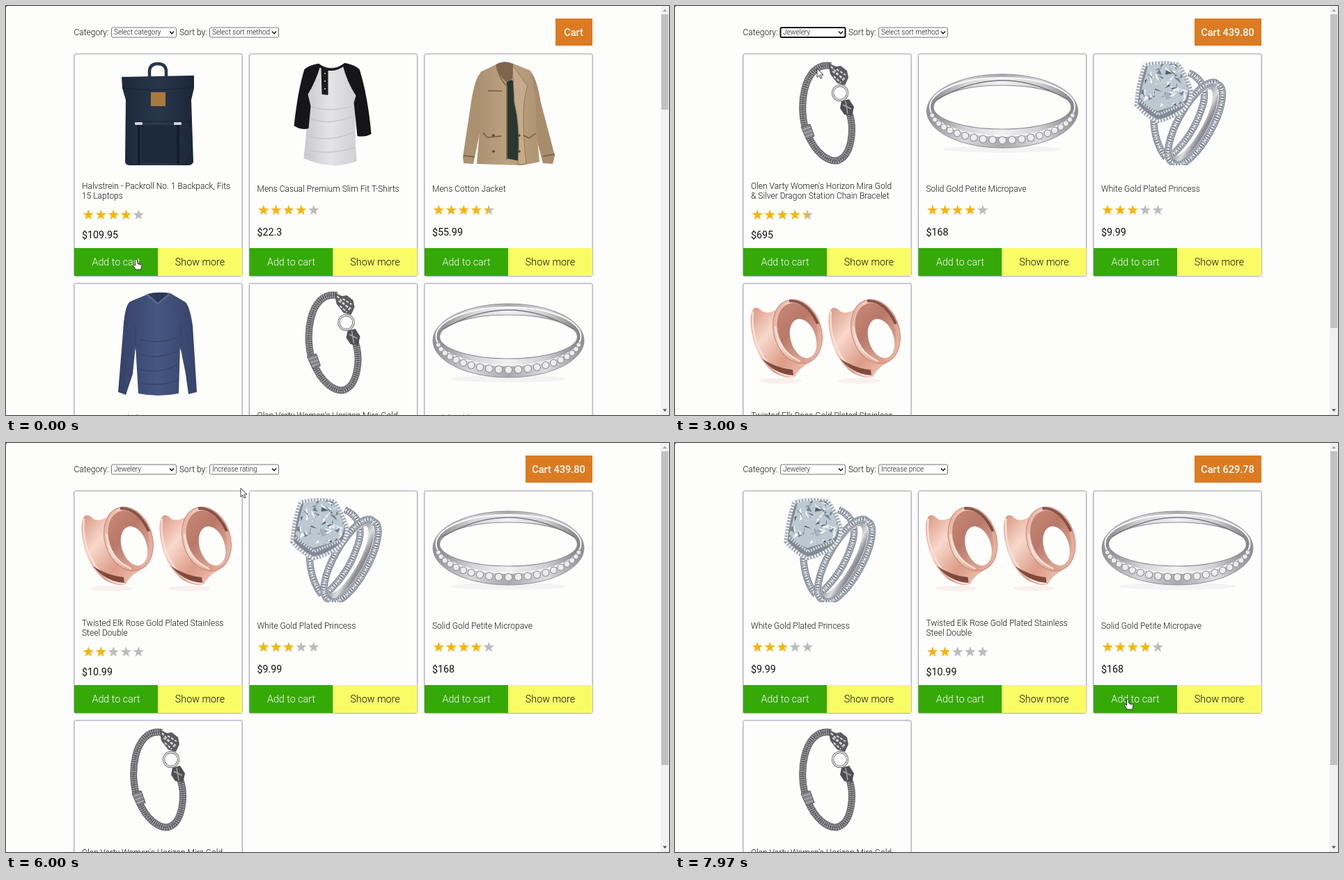
An HTML page that plays this animation: 952 by 588 pixels, repeating every 8000 ms.

```html
<!DOCTYPE html>
<html lang="en">
<head>
<meta charset="utf-8">
<title>Shop</title>
<style>
  html, body { margin: 0; width: 100%; height: 100%; overflow: hidden; background: #fdfdfc; }
  svg { display: block; width: 952px; height: 588px; }
  text { font: 300 12px Roboto, sans-serif; fill: #111; }
  .price { font-size: 14.3px; font-weight: 400; }
  .button { font-size: 14.3px; text-anchor: middle; }
  .cart { font-size: 14.5px; font-weight: 500; fill: #fff; text-anchor: middle; }
  .option { font-size: 10px; }
  .light { fill: #fff; }
</style>
</head>
<body>
<svg id="stage" viewBox="0 0 952 588" xmlns="http://www.w3.org/2000/svg"></svg>
<script>
const LOOP = 8000;
const stage = document.getElementById('stage');

let seed = 7;
const random = () => (seed = (seed * 16807) % 2147483647) / 2147483647;
const repeat = (n, draw) => Array.from({ length: n }, (_, i) => draw(i)).join('');
const path = (d, fill, more = '') => `<path d="${d}" fill="${fill}" ${more}/>`;
const line = (d, color, width = 1, more = '') =>
  `<path d="${d}" fill="none" stroke="${color}" stroke-width="${width}" ${more}/>`;
const rect = (x, y, w, h, fill, more = '') =>
  `<rect x="${x}" y="${y}" width="${w}" height="${h}" fill="${fill}" ${more}/>`;
const circle = (cx, cy, r, fill, more = '') => `<circle cx="${cx}" cy="${cy}" r="${r}" fill="${fill}" ${more}/>`;
const oval = (cx, cy, rx, ry, turn, attrs) =>
  `<ellipse cx="${cx}" cy="${cy}" rx="${rx}" ry="${ry}" transform="rotate(${turn} ${cx} ${cy})" ${attrs}/>`;
const text = (x, y, content, cls = '') => `<text x="${x}" y="${y}" class="${cls}">${content}</text>`;
const gradient = (id, colors, x2 = 1, y2 = 0) =>
  `<linearGradient id="${id}" x2="${x2}" y2="${y2}">${colors.map((c, i) =>
    `<stop offset="${i / (colors.length - 1)}" stop-color="${c}"/>`).join('')}</linearGradient>`;

const GOLD = '#f4b50f', PALE = '#bcbcbe', PAGE = '#fdfdfc';
const STONE = 'M78 17Q100 12 121 15L137 50Q134 66 126 72L92 82Q76 76 66 62Z';

const sparklingBand = d => line(d, '#858a95', 10) + line(d, '#b9bec8', 7.5) +
  line(d, '#666d7a', 6.5, 'stroke-dasharray="1.2 2.2"') + line(d, '#f0f2f5', 3, 'stroke-dasharray="1.8 2.6"');

function facets() {
  const shades = ['#fff', '#c3cfd7', '#75848f', '#e6edf1', '#a3b2bc', '#53626d'];
  return repeat(130, i => {
    const x = 62 + random() * 78, y = 12 + random() * 72;
    const near = () => `${(x + random() * 14 - 7).toFixed(1)} ${(y + random() * 14 - 7).toFixed(1)}`;
    return path(`M${near()}L${near()}L${near()}Z`, shades[i % shades.length]);
  });
}

function tunnel(dx) {
  return `<g transform="translate(${dx})">` +
    oval(54, 140, 30, 4, 0, 'fill="#f8ebe6" opacity=".7"') +
    path('M15 36Q8 44 12 70Q18 108 44 128Q62 138 74 134Q78 124 94 114L52 34Q34 48 24 37Q19 33 15 36Z', 'url(#rose)') +
    line('M14 40Q10 78 32 110Q50 134 72 133', '#f9e0d6', 2.5) +
    path('M27 108Q44 130 72 132L71 124Q48 122 27 108Z', '#6f3a2e', 'opacity=".85"') +
    oval(78, 69, 34, 47, -18, 'fill="url(#rose)" stroke="#c48a78"') +
    oval(78, 68, 28, 41, -18, 'fill="url(#hollow)"') +
    oval(86, 79, 18, 29, -18, `fill="${PAGE}"`) +
    line('M66 25Q92 24 107 58', '#6f3a2e', 4, 'opacity=".8"') +
    line('M46 62Q50 98 82 112', '#fbe6dd', 2) + '</g>';
}

const pictures = {
  backpack: () =>
    line('M108 34V24Q109 14 120 14Q131 14 132 24V34', '#27364c', 4.5) +
    path('M68 33L172 31V49L168 66L171 155Q170 160 163 160H80Q73 160 73 154L74 66L69 49Z', 'url(#navy)') +
    line('M69 49Q120 54 172 48M74 97H168', '#172234') +
    path('M95 101H148V158H95Z', '#1d293c', 'stroke="#35445b"') +
    line('M93 97V158M149 97V158', '#141d2c', 4) +
    rect(87, 98, 11, 4, '#cfd2d6', 'rx="1"') + rect(143, 98, 11, 4, '#cfd2d6', 'rx="1"') +
    rect(110, 55, 21, 20, '#a8793f'),

  tee: () =>
    path('M98 14Q118 24 138 13L153 58Q150 100 154 154Q118 168 78 150Q84 100 84 55Z', 'url(#cloth)') +
    path('M98 14Q86 16 79 22Q70 50 64 103Q74 110 85 107L88 75L84 58Q95 40 102 17Z', '#161619') +
    path('M138 13Q152 16 158 22Q170 60 175 115Q166 120 155 118L150 70L153 60Q140 40 134 16Z', '#161619') +
    line('M98 15Q118 30 138 14', '#161619', 3.5) + path('M103 19L113 21V59L104 58Z', '#1b1b1e') +
    line('M87 92Q110 104 148 90M84 118Q116 128 150 112M82 138Q116 146 152 134M90 76Q112 84 146 76', '#c8c8cc', 1.5) +
    repeat(3, i => circle(108.5, 28 + 11 * i, 1, '#ddd')),

  jacket: () =>
    path('M82 26Q72 32 66 75L55 148L56 157L70 158L80 110L86 60Z', '#ac9170') +
    path('M148 22Q160 27 167 70L187 146L184 158L170 157L155 100Z', '#a88c6b') +
    path('M80 26L103 15Q114 10 128 14L152 24Q162 60 160 100L165 155L140 160L75 158L80 100Z', 'url(#khaki)') +
    path('M118 36L134 40Q130 90 140 118L138 154L117 150Z', '#2a3630') +
    path('M126 15L148 46Q137 75 146 158L134 159Q138 105 129 70Z', '#c5ab8b', 'stroke="#927957"') +
    path('M103 15Q114 8 127 14L126 36L118 41Q105 30 103 15Z', '#7d664c') +
    line('M103 15Q106 34 118 46V152', '#856c50', 2) +
    line('M91 53H111M84 113L90 120L110 118M142 117L150 121L160 114M56 146L72 148M170 147L187 144', '#725b42', 1.5) +
    repeat(4, i => circle(i % 2 ? 136 : 99, i < 2 ? 117 : 140, 1.8, '#56432f')),

  shirt: () =>
    path('M104 16L80 26Q72 32 70 70L63 156L74 160L84 130L88 90L92 158Q120 164 150 158L152 90L160 130L164 159L176 156L170 60Q166 34 160 27L138 14L120 28Z', 'url(#denim)') +
    path('M105 15Q120 11 138 14L120 28Z', '#2c3757') +
    line('M104 16L120 29L138 14', '#566690', 2.5) +
    line('M90 100Q118 112 150 96M91 122Q120 132 150 116M92 142Q122 150 150 138M94 80Q118 88 148 78M88 60V95M153 58V95', '#364267', 1.2),

  bracelet: () => {
    const chain = 'M126 17C84 10 78 84 92 114C103 142 122 156 136 153C156 146 160 108 152 84';
    return line(chain, '#626266', 10) + line(chain, '#a9a9ac', 8, 'stroke-dasharray="1.3 1.7"') +
      line(chain, '#4e4e52', 1.2, 'stroke-dasharray="2 2"') +
      circle(139, 56, 10.5, 'none', 'stroke="#77777a" stroke-width="3.5"') +
      circle(139, 56, 10.5, 'none', 'stroke="#dededf" stroke-width="1.6"') +
      path('M122 13L133 18L140 17L149 24L151 34L146 45L135 42L125 29Z', '#5c5c60') +
      line('M126 18L144 38M134 22L147 30M130 32L140 41M128 25L146 36', '#dcdcde', 2, 'stroke-dasharray="4 2"') +
      path('M141 68L152 65L159 76L156 89L145 87L139 78Z', '#4f4f53') +
      line('M143 73L155 79M147 68L150 86', '#a8a8ab', 1.5) +
      path('M83 105L96 101L102 118L91 123Z', '#85858a', 'stroke="#55555a"') +
      line('M85 109L97 105M87 114L99 110M89 119L100 115', '#c0c0c4', 1);
  },

  bangle: () =>
    oval(120.5, 137, 84, 5, 0, 'fill="#f3f3f4"') +
    oval(120.5, 82, 108.5, 53, 0, 'fill="url(#silver)" stroke="#929296"') +
    oval(120.5, 76, 104, 42, 0, 'fill="url(#wall)" stroke="#fafafa" stroke-width="2"') +
    oval(120.5, 76.5, 99, 31.5, 0, `fill="${PAGE}" stroke="#8b8b90" stroke-width="1.2"`) +
    line('M26 66Q120 10 215 66', '#77777c', 1.5) +
    repeat(21, i => {
      const a = Math.PI * (12 + 156 * i / 20) / 180, r = 2.8 + 2.6 * Math.sin(a);
      return circle(120.5 + 103 * Math.cos(a), 79 + 45 * Math.sin(a), r, '#ededf0', 'stroke="#97979c" stroke-width="1.2"');
    }),

  ring: () => '<g clip-path="url(#photo)">' +
    sparklingBand('M86 90Q87 128 104 149') +
    sparklingBand('M137 27Q170 42 154 82Q142 118 112 146') +
    oval(142, 99, 19, 59, 29, 'fill="none" stroke="url(#silver)" stroke-width="8"') +
    sparklingBand('M178 44A22 65 29 1 1 114 156A22 65 29 1 1 178 44') + '</g>' +
    (halo => path(halo, '#828a94') + line(halo, '#9aa2ac', 5) +
      line(halo, '#eef1f4', 5, 'stroke-dasharray="2.4 2"'))(
      'M73 16Q98 10 122 15Q134 32 140 52Q140 70 130 79Q112 93 92 97Q74 88 61 73Q64 40 73 16Z') +
    line('M66 67L93 87L132 71', '#d5dbe1', 4, 'stroke-dasharray="2 1.8"') +
    path(STONE, '#bdc9d1') + `<g clip-path="url(#stone)">${facets()}</g>`,

  tunnels: () => tunnel(0) + tunnel(112)
};

const products = {
  backpack: [['Halvstrein - Packroll No. 1 Backpack, Fits', '15 Laptops'], 4, '109.95'],
  tee: [['Mens Casual Premium Slim Fit T-Shirts'], 4, '22.3'],
  jacket: [['Mens Cotton Jacket'], 4.5, '55.99'],
  shirt: [['Mens Casual Slim Fit'], 2, '15.99'],
  bracelet: [['Olen Varty Women\'s Horizon Mira Gold', '&amp; Silver Dragon Station Chain Bracelet'], 4.5, '695'],
  bangle: [['Solid Gold Petite Micropave'], 4, '168'],
  ring: [['White Gold Plated Princess'], 3, '9.99'],
  tunnels: [['Twisted Elk Rose Gold Plated Stainless', 'Steel Double'], 2, '10.99']
};

const views = {
  all: ['backpack', 'tee', 'jacket', 'shirt', 'bracelet', 'bangle'],
  jewelery: ['bracelet', 'bangle', 'ring', 'tunnels'],
  rating: ['tunnels', 'ring', 'bangle', 'bracelet'],
  price: ['ring', 'tunnels', 'bangle', 'bracelet']
};

const starPath = 'M' + Array.from({ length: 10 }, (_, i) => {
  const r = i % 2 ? 3.3 : 8, a = Math.PI * i / 5;
  return `${(r * Math.sin(a)).toFixed(2)} ${(-r * Math.cos(a)).toFixed(2)}`;
}).join('L') + 'Z';

function card(id, slot) {
  const [title, rating, price] = products[id];
  const tall = title.length > 1;
  const star = i => path(starPath, rating > i + .9 ? GOLD : rating > i ? 'url(#half)' : PALE,
    `transform="translate(${20.3 + 18 * i} ${tall ? 231.5 : 224.7})"`);
  return `<g transform="translate(${98 + 251.5 * (slot % 3)} ${69 + 330 * Math.floor(slot / 3)})">` +
    rect(0, 0, 241, 319, PAGE, 'rx="2" filter="url(#shadow)"') +
    rect(0, 0, 241, 319, PAGE, 'rx="2" stroke="#9797ab" stroke-width=".8"') +
    `<use href="#${id}"/>` +
    title.map((t, i) => text(11, (tall ? 193.7 : 197.7) + 14 * i, t)).join('') +
    repeat(5, star) + text(11, tall ? 264.5 : 261, '$' + price, 'price') +
    rect(0, 279, 120, 40, '#35a908') + rect(120, 279, 121, 40, '#fafc66') +
    text(60, 304, 'Add to cart', 'button light') + text(180.5, 304, 'Show more', 'button') + '</g>';
}

const selects = {
  category: { x: 151, w: 94, options: ['Select category', 'Electronics', 'Jewelery', 'Men\'s clothing', 'Women\'s clothing'] },
  sort: { x: 292, w: 100, options: ['Select sort method', 'Increase price', 'Increase rating', 'Decrease price', 'Decrease rating'] }
};

function selectBox({ x, w, options }, value, focused) {
  return rect(x + .5, 31, w - 1, 14, '#fff', focused
    ? 'rx="2" stroke="#101010" stroke-width="2"' : 'rx="2" stroke="#767676"') +
    text(x + 4, 41.3, options[value], 'option') +
    line(`M${x + w - 10} 36.5l3 3.2l3 -3.2`, '#111', 1.5);
}

function popup({ x, w, options }, cursorY) {
  const hovered = cursorY < 47 ? -1 : Math.floor((cursorY - 47) / 15);
  return rect(x + .5, 46.5, w - 1, 76, '#fff', 'stroke="#767676"') + options.map((option, i) =>
    (i === hovered ? rect(x + 1, 47 + 15 * i, w - 2, 15, '#1967d2') : '') +
    text(x + 4, 58 + 15 * i, option, i === hovered ? 'option light' : 'option')).join('');
}

stage.innerHTML = '<defs>' +
  `<linearGradient id="half"><stop offset=".5" stop-color="${GOLD}"/><stop offset=".5" stop-color="${PALE}"/></linearGradient>` +
  gradient('navy', ['#1c283b', '#28364b', '#1b2638']) +
  gradient('cloth', ['#c9c9cd', '#e4e4e6', '#d0d0d4']) +
  gradient('khaki', ['#ab9070', '#bda281', '#af9473']) +
  gradient('denim', ['#35426a', '#465680', '#36436a']) +
  gradient('silver', ['#8f8f94', '#d9d9dc', '#a8a8ad', '#dedee1', '#8c8c91']) +
  gradient('wall', ['#85858a', '#d5d5d8', '#f2f2f3', '#d0d0d3', '#808085']) +
  gradient('rose', ['#d9937f', '#f8d9cc', '#dc9c88', '#f3c8b9'], 1, 1) +
  gradient('hollow', ['#c88b7a', '#b97868', '#d9a594'], .4, 1) +
  '<clipPath id="photo"><path d="M0 0H241V160H0Z"/></clipPath>' +
  `<clipPath id="stone"><path d="${STONE}"/></clipPath>` +
  '<filter id="shadow" x="-5%" y="-5%" width="110%" height="110%"><feDropShadow dx="0" dy="0.3" stdDeviation="1" flood-color="#45455f" flood-opacity=".6"/></filter>' +
  Object.entries(pictures).map(([id, draw]) => `<g id="${id}">${draw()}</g>`).join('') + '</defs>' +
  rect(0, 0, 952, 588, PAGE) + rect(0, 0, 1, 1, '#000') +
  Object.entries(views).map(([id, list]) => `<g id="view-${id}">${list.map(card).join('')}</g>`).join('') +
  text(97.5, 42, 'Category:') + text(249, 42, 'Sort by:') +
  '<g id="controls"></g>' +
  rect(940, 0, 12, 588, '#f1f1f1') + rect(941, 12, 10, 137, '#c1c1c1', 'id="thumb"') +
  path('M943 8L946 4.5L949 8Z', '#a3a3a3') + path('M943 579.5L946 583L949 579.5Z', '#505050') +
  '<g id="arrow">' + path('M0 0V12.5L3 9.8L5 14.2L7 13.3L5 9H9Z', '#fff', 'stroke="#111" stroke-width=".8"') + '</g>' +
  '<g id="hand">' + path('M-1.5 1Q0 -1 1.5 1V6L7 7.5Q8 8 8 10L6.5 15H-.5L-4.5 9.5Q-4.5 7.5 -1.5 9Z', '#fff', 'stroke="#111" stroke-width=".8"') +
  line('M3.3 6.5V9M5.6 7V9.3', '#111', .6) + '</g>';

const find = id => document.getElementById(id);
const controls = find('controls');

// Each entry holds from its time until the next one.
const cartSteps = [[0, ''], [300, '109.95'], [650, '219.90'], [1000, '329.85'], [1340, '439.80'],
  [7060, '450.79'], [7300, '461.78'], [7880, '629.78']];
const viewSteps = [[0, 'all'], [2570, 'jewelery'], [3960, 'rating'], [6620, 'price']];
const focusSteps = [[0, ''], [1980, 'category'], [3520, 'sort'], [5200, ''], [6180, 'sort'], [7060, '']];
const popupSteps = [[0, ''], [1980, 'category'], [2570, ''], [3520, 'sort'], [3960, ''], [6180, 'sort'], [6620, '']];
const cursorKeys = [[0, 187, 364], [300, 184, 366], [1480, 184, 366], [1940, 206, 38], [2120, 206, 38],
  [2480, 204, 90], [3270, 204, 90], [3480, 328, 38], [3620, 328, 38], [3860, 325, 90], [4800, 325, 90],
  [5150, 346, 60], [5800, 346, 60], [6000, 337, 65], [6150, 336, 39], [6260, 336, 39], [6480, 336, 69],
  [6640, 336, 69], [6980, 394, 377], [7380, 394, 377], [7740, 650, 368], [8000, 650, 368]];

const current = (steps, t) => steps.filter(([start]) => start <= t).pop()[1];

function cursorAt(t) {
  const i = cursorKeys.findIndex(([end]) => end > t);
  const [t0, x0, y0] = cursorKeys[i - 1], [t1, x1, y1] = cursorKeys[i];
  const p = (t - t0) / (t1 - t0), e = p * p * (3 - 2 * p);
  return [x0 + (x1 - x0) * e, y0 + (y1 - y0) * e];
}

function render(now) {
  const t = now % LOOP;
  const view = current(viewSteps, t), focus = current(focusSteps, t), open = current(popupSteps, t);
  const total = current(cartSteps, t), cartX = total ? 746 : 789;
  const [x, y] = cursorAt(t);

  for (const id in views) find('view-' + id).style.display = id === view ? '' : 'none';
  controls.innerHTML =
    selectBox(selects.category, view === 'all' ? 0 : 2, focus === 'category') +
    selectBox(selects.sort, { rating: 2, price: 1 }[view] || 0, focus === 'sort') +
    rect(cartX, 18, 842 - cartX, 39, '#dc7b21') +
    text((cartX + 842) / 2 - .5, 43, total ? 'Cart ' + total : 'Cart', 'cart') +
    (open ? popup(selects[open], y) : '');
  find('thumb').setAttribute('height', view === 'all' ? 137 : 451);

  const onButton = y > 348 && y < 388;
  for (const [id, shown] of [['hand', onButton], ['arrow', !onButton]]) {
    find(id).style.display = shown ? '' : 'none';
    find(id).setAttribute('transform', `translate(${x} ${y})`);
  }
}

const start = performance.now();
function tick() {
  render(Math.max(0, performance.now() - start));
  requestAnimationFrame(tick);
}
tick();
</script>
</body>
</html>
```
